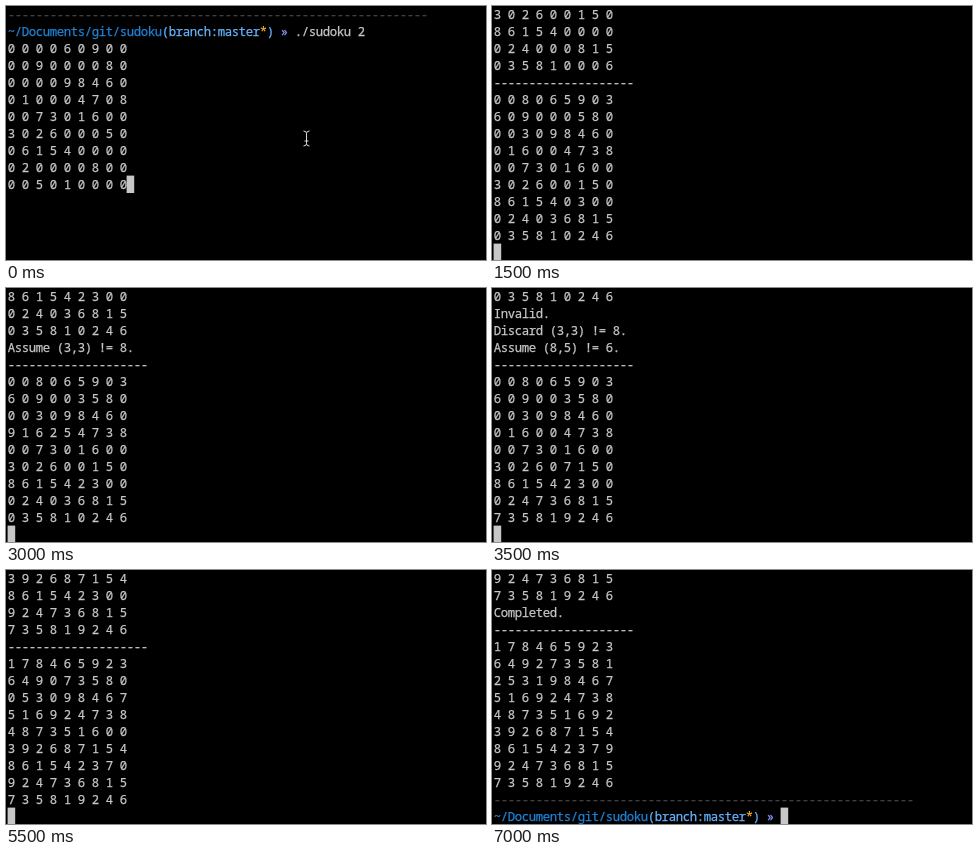
Animation of 480 by 254 pixels, one loop 7300 ms. Source, as an HTML page with a canvas:

```html
<!DOCTYPE html>
<html lang="en">
<head>
<meta charset="utf-8">
<title>Sudoku solver</title>
<style>
  html, body { margin: 0; width: 100%; height: 100%; overflow: hidden; background: #000; }
  canvas { display: block; }
</style>
</head>
<body>
<canvas id="term" width="480" height="254"></canvas>
<script>
const ctx = document.getElementById('term').getContext('2d');
const LOOP = 7300, COL = 7, ROW = 17, LEFT = 2, ROWS = 15;
const FG = '#c7c7c7';

const plain = text => [[FG, text]];
const longRule = [['#444', '-'.repeat(60)]];
const shortRule = plain('-'.repeat(20));
const prompt = [
  ['#1f83d6', '~/Documents/git/sudoku'],
  ['#66b3ff', '(branch:master'],
  ['#ffb02a', '*'],
  ['#66b3ff', ')'],
  ['#8b97ff', ' » ']
];

const puzzle = [
  '000060900', '009000080', '000098460',
  '010004708', '007301600', '302600050',
  '061540000', '020000800', '005010000'
];

// Each pass: time, cells as row-column-value, messages printed before the grid.
const passes = [
  [500, '028 106 165 223 326 373 561 608 785 838'],
  [1000, '055 724 771 813 886'],
  [1500, '083 663 743 756 862 874'],
  [2000, '153 652'],
  [2500, ''],
  [3000, '332 345 309', 'Assume (3,3) != 8.'],
  [3100, '448'],
  [3200, '547 559'],
  [3300, '518 584'],
  [3400, ''],
  [3500, '330 340 300 440 540 510 580 557 737 807 859',
    'Invalid.', 'Discard (3,3) != 8.', 'Assume (8,5) != 6.'],
  [3600, ''],
  [3700, '342', 'Assume (3,4) != 4.'],
  [3800, '339 305'],
  [3900, '709'],
  [4000, '548'],
  [4100, '147'],
  [4200, '418'],
  [4300, '114'],
  [4400, ''],
  [4500, ''],
  [5000, '017 034 215 404 445 519 584'],
  [5500, '001 072 287 677'],
  [6000, '132 181 202 231 479 482 689'],
  [6500, '', 'Completed.']
];

function buildScreens() {
  const grid = puzzle.map(row => [...row]);
  const gridLines = () => grid.map(row => plain(row.join(' ')));
  let log = [longRule, [...prompt, [FG, './sudoku 2']], ...gridLines()];
  const screens = [];
  const snap = (time, lines) => screens.push({ time, lines: lines.slice(-ROWS) });

  snap(0, log);
  snap(400, [...log, []]);
  for (const [time, cells, ...notes] of passes) {
    for (const [r, c, v] of cells.split(' ').filter(Boolean)) grid[r][c] = v;
    log = [...log, ...notes.map(plain), shortRule, ...gridLines()];
    snap(time, [...log, []]);
  }
  log.push(longRule);
  snap(6600, [...log, []]);
  snap(6700, [...log, prompt]);
  return screens;
}

function drawLine(spans, row) {
  const y = row * ROW + 13;
  let col = 0;
  for (const [color, text] of spans) {
    ctx.fillStyle = ctx.strokeStyle = color;
    for (const ch of text) {
      const x = LEFT + (col++ + 0.5) * COL;
      ctx.fillText(ch, x, y);
      ctx.strokeText(ch, x, y);
    }
  }
  return col;
}

function drawPointer(x, y) {
  ctx.strokeStyle = '#d8d8d8';
  ctx.lineWidth = 1;
  ctx.beginPath();
  for (const side of [-1, 1]) {
    const tip = y + side * 7.5, neck = y + side * 5;
    ctx.moveTo(x - 3, tip);
    ctx.quadraticCurveTo(x, tip, x, neck);
    ctx.quadraticCurveTo(x, tip, x + 3, tip);
  }
  ctx.moveTo(x, y - 5);
  ctx.lineTo(x, y + 5);
  ctx.moveTo(x - 2, y + 2.5);
  ctx.lineTo(x + 2, y + 2.5);
  ctx.stroke();
}

const screens = buildScreens();

function draw(now) {
  const t = now % LOOP;
  const { lines } = screens.findLast(s => s.time <= t);
  ctx.fillStyle = '#000';
  ctx.fillRect(0, 0, 480, 254);
  ctx.font = '12.3px "Noto Sans Mono", "DejaVu Sans Mono", monospace';
  ctx.textAlign = 'center';
  ctx.lineWidth = 0.25;
  let end = 0;
  lines.forEach((line, row) => { end = drawLine(line, row); });
  ctx.fillStyle = FG;
  ctx.fillRect(LEFT + end * COL - 0.4, (lines.length - 1) * ROW - 0.4, COL + 0.6, ROW + 0.4);
  if (t < 200) drawPointer(300.5, 132.5);
}

let start;
function tick(now) {
  start ??= now;
  draw(now - start);
  requestAnimationFrame(tick);
}
draw(0);
requestAnimationFrame(tick);
</script>
</body>
</html>
```
